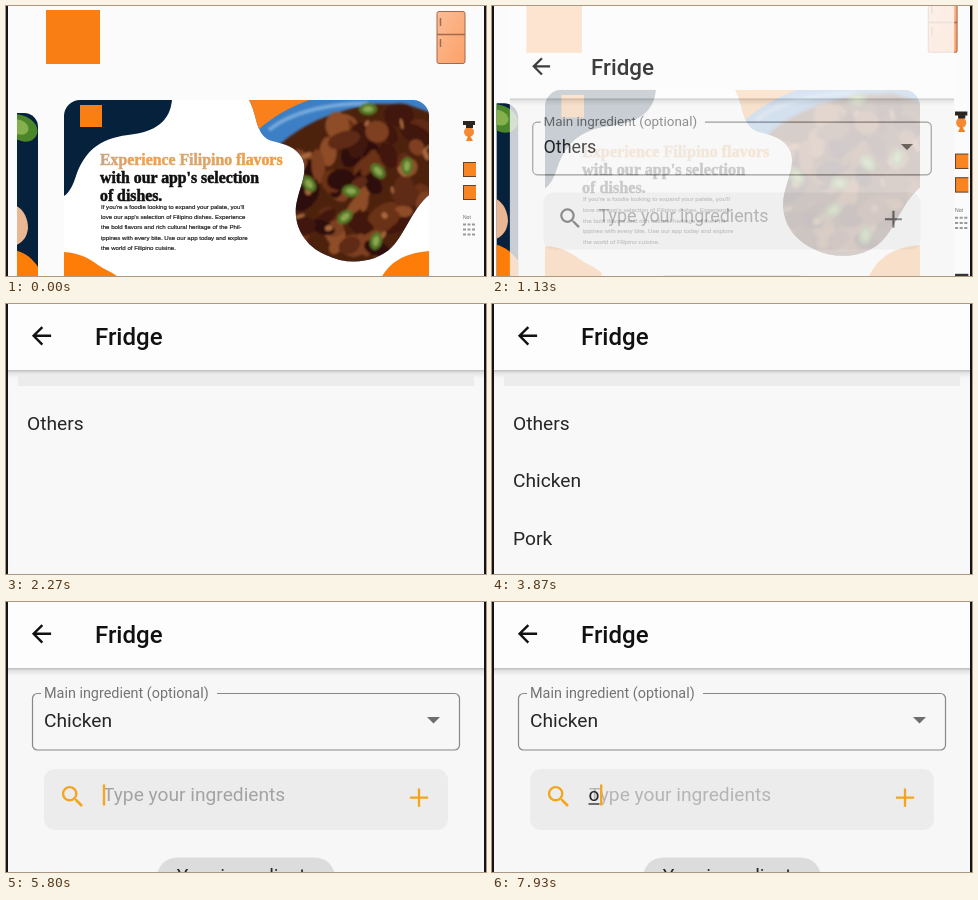
Recreate the animation shown at these times as an HTML page. Size 480 by 270 pixels, loop 8000 ms.

```html
<!DOCTYPE html>
<html lang="en">
<head>
<meta charset="utf-8">
<title>Fridge screen</title>
<style>
  html, body { margin: 0; width: 100%; height: 100%; overflow: hidden; background: #f8f8f8; }
  svg { display: block; width: 100vw; height: 100vh; }
  text { font-family: Roboto, sans-serif; font-size: 19.2px; fill: #262626; }
  .title { font-size: 24px; font-weight: 500; fill: #111; }
  .label { font-size: 14.4px; fill: #747474; }
  .hint { fill: #a3a3a3; }
  .head text { font: bold 15.8px "Liberation Serif", serif; stroke: #111; stroke-width: .5px; fill: #111; }
  .head .hot { fill: url(#warm); stroke: url(#warm); }
  .copy text { font: 6.1px "Liberation Sans", sans-serif; fill: #222; stroke: #222; stroke-width: .2px; }
  .tiny { font: 5px "Liberation Sans", sans-serif; fill: #666; }
</style>
</head>
<body>
<svg viewBox="0 0 480 270" preserveAspectRatio="none">
  <defs>
    <linearGradient id="warm" gradientUnits="userSpaceOnUse" x1="94" y1="0" x2="278" y2="0">
      <stop offset="0" stop-color="#c9a585"/>
      <stop offset=".25" stop-color="#f0a04e"/>
      <stop offset=".5" stop-color="#d6a672"/>
      <stop offset="1" stop-color="#f59a35"/>
    </linearGradient>
    <linearGradient id="drop" x1="0" y1="0" x2="0" y2="1">
      <stop offset="0" stop-color="#000" stop-opacity=".24"/>
      <stop offset=".35" stop-color="#000" stop-opacity=".08"/>
      <stop offset="1" stop-color="#000" stop-opacity="0"/>
    </linearGradient>
    <linearGradient id="door" x1="0" y1="0" x2="1" y2="1">
      <stop offset="0" stop-color="#fbbd98"/>
      <stop offset="1" stop-color="#fca066"/>
    </linearGradient>
    <filter id="soft"><feGaussianBlur stdDeviation="1.3"/></filter>
    <clipPath id="card"><rect x="58" y="94" width="365" height="240" rx="16"/></clipPath>
    <clipPath id="lane"><rect x="11" y="70" width="459" height="260"/></clipPath>
    <clipPath id="side"><rect x="-40" y="107" width="72" height="220" rx="14"/></clipPath>
    <clipPath id="photo"><path d="M243 94H423V189C406 203 399 228 386 241C370 257 342 260 320 249C297 239 288 219 290 200C293 181 303 166 296 152C290 141 279 138 266 135C249 130 252 110 243 94Z"/></clipPath>
    <clipPath id="grow"><rect id="growBox" x="0" y="60" width="480" height="210"/></clipPath>
  </defs>

  <g id="home">
    <rect x="-40" y="-60" width="560" height="400" fill="#fbfbfb"/>
    <rect x="40" y="4" width="54" height="54" fill="#f97f14"/>
    <g fill="url(#door)" stroke="#a2694c">
      <rect x="431" y="5.5" width="28" height="52" rx="2"/>
      <path d="M431 28.5H459M434.5 12V20M434.5 33V41" fill="none" stroke-width="1.5"/>
    </g>
    <g clip-path="url(#lane)">
      <g clip-path="url(#side)">
        <rect x="0" y="100" width="40" height="220" fill="#06213b"/>
        <path d="M8 108C22 108 34 118 31 128C27 138 16 137 8 132Z" fill="#4c862b"/>
        <path d="M8 113C18 113 24 119 22 125C19 130 14 129 8 127Z" fill="#84b04d"/>
        <path d="M8 199C17 202 22 212 22 222C21 232 16 237 8 240Z" fill="#e9b794"/>
        <path d="M8 244C18 246 27 252 34 264V300H8Z" fill="#fd7d08"/>
      </g>
      <g clip-path="url(#card)">
        <rect x="58" y="94" width="365" height="240" fill="#fff"/>
        <path d="M58 94H166C164 115 150 126 122 129C91 133 79 147 71 167C67 180 63 187 58 190Z" fill="#06213b"/>
        <rect x="74" y="99" width="22" height="22" fill="#f97f14"/>
        <path d="M58 246C73 247 83 252 92 259C99 264 107 266 113 272V300H58Z" fill="#fd7d08"/>
        <path d="M374 274C384 254 401 247 423 245V300H374Z" fill="#fd7d08"/>
        <g clip-path="url(#photo)">
          <rect x="240" y="90" width="190" height="175" fill="#3d7fc4"/>
          <g filter="url(#soft)">
            <path d="M263 124C285 106 320 98 362 97" fill="none" stroke="#75a9dc" stroke-width="4"/>
            <path d="M270 142C295 118 325 106 365 98H400L440 112V270H270Z" fill="#4d2110"/>
            <g id="meat"></g>
          </g>
          <path d="M240 90H314C288 99 270 108 252 124H240Z" fill="#f9801a"/>
        </g>
      </g>
      <g class="head">
        <text class="hot" x="94" y="159">Experience Filipino flavors</text>
        <text x="94" y="177">with our app's selection</text>
        <text x="94" y="194.5">of dishes.</text>
      </g>
      <g class="copy" id="copy"></g>
      <circle cx="463" cy="126" r="5" fill="#f58a35"/>
      <path d="M457 115H469V119H457ZM460 119H467V122H460Z" fill="#2b2522"/>
      <path d="M460 135L463 128L467 135Z" fill="#f58220"/>
      <g fill="#f98522" stroke="#684128">
        <rect x="457.5" y="156.5" width="14" height="14"/>
        <rect x="457.5" y="179.5" width="14" height="14"/>
      </g>
      <text class="tiny" x="457" y="213">Not</text>
      <path d="M457 218.5H469M457 223.5H469M457 228.5H469" stroke="#999" stroke-width="2" stroke-dasharray="3 1.5"/>
      <rect x="457" y="273" width="14" height="6" fill="#333"/>
    </g>
  </g>

  <g id="fridge">
    <rect x="2" y="-60" width="476" height="400" fill="#f7f7f7"/>
    <rect x="2" y="66" width="476" height="8" fill="url(#drop)"/>
    <rect x="2" y="-60" width="476" height="126" fill="#fdfdfd"/>
    <path transform="translate(21.1 17.4) scale(1.2)" fill="#111" d="M20 11H7.83l5.59-5.59L12 4l-8 8 8 8 1.41-1.41L7.83 13H20z"/>
    <text class="title" x="89" y="40.7">Fridge</text>

    <path id="box" fill="none" d="M35 91.5H31.5a5 5 0 0 0-5 5V143a5 5 0 0 0 5 5H448.5a5 5 0 0 0 5-5V96.5a5 5 0 0 0-5-5H211"/>
    <text class="label" x="38" y="95.5">Main ingredient (optional)</text>
    <text id="pick" x="38" y="125"></text>
    <path d="M421 115H434L427.5 121.5Z" fill="#6d6d6d"/>

    <rect x="38" y="167" width="404" height="61" rx="11" fill="#ececec"/>
    <g id="icons">
      <path transform="translate(52.3 180.3) scale(1.2)" d="M15.5 14h-.79l-.28-.27A6.47 6.47 0 0 0 16 9.5 6.5 6.5 0 1 0 9.5 16c1.61 0 3.09-.59 4.23-1.57l.27.28v.79l5 4.99L20.49 19zm-6 0C7.01 14 5 11.99 5 9.5S7.01 5 9.5 5 14 7.01 14 9.5 11.99 14 9.5 14z"/>
      <path transform="translate(397.4 180) scale(1.3)" d="M19 12.9h-6.1v6.1h-1.8v-6.1H5v-1.8h6.1V5h1.8v6.1H19z"/>
    </g>
    <text id="hint" class="hint" x="97" y="199">Type your ingredients</text>
    <g id="typed">
      <text x="96.5" y="199">o</text>
      <path d="M96.5 202H107.5" stroke="#262626" stroke-width="1.3"/>
    </g>
    <rect id="caret" y="182.5" width="2.4" height="21" fill="#f5a623"/>
    <rect x="151" y="255.5" width="178" height="40" rx="20" fill="#dcdcdc"/>
    <text x="240" y="280" text-anchor="middle">Your ingredients</text>
  </g>

  <g id="menu" clip-path="url(#grow)">
    <rect x="12" y="70" width="456" height="12" fill="#ececec"/>
    <rect x="4" y="82" width="472" height="200" fill="#f8f8f8"/>
    <rect id="ink" x="4" y="148" width="472" height="57.6" fill="#000"/>
    <text x="21" y="125.5">Others</text>
    <text class="item" x="21" y="183">Chicken</text>
    <text class="item" x="21" y="240.7">Pork</text>
  </g>

  <path d="M0 0H2V270H0ZM478 0H480V270H478Z" fill="#141414"/>
</svg>
<script>
const LOOP = 8000;
const $ = id => document.getElementById(id);
const set = (el, attrs) => { for (const k in attrs) el.setAttribute(k, attrs[k]); };
const ramp = (t, a, b) => Math.min(1, Math.max(0, (t - a) / (b - a)));
const mix = (a, b, p) => `rgb(${a.map((v, i) => Math.round(v + (b[i] - v) * p))})`;
const zoom = s => `translate(240 460) scale(${s}) translate(-240 -460)`;

const ORANGE = [245, 164, 28], GREY = [138, 136, 132], DARK = [112, 112, 112];
const items = [...document.querySelectorAll('.item')];

function add(parent, tag, attrs, content = '') {
  const el = document.createElementNS('http://www.w3.org/2000/svg', tag);
  set(el, attrs);
  el.textContent = content;
  parent.append(el);
}

let seed = 11;
const rnd = () => (seed = seed * 16807 % 2147483647) / 2147483647;

// Food: soft brown lumps with scallion bits on top
function cook() {
  const browns = ['#6b3013', '#7f4120', '#41190c', '#8e4d28', '#2d1008', '#5f2a14'];
  const bits = [[362, 103], [372, 165], [401, 160], [339, 211], [345, 185], [303, 178], [370, 235]];
  const lump = (rx, ry, fill) => {
    const x = 290 + rnd() * 132, y = 108 + rnd() * 142;
    if (x + 2 * y < 570) return;
    add($('meat'), 'ellipse', { rx, ry, fill, transform: `translate(${x} ${y}) rotate(${rnd() * 180})` });
  };
  for (let i = 0; i < 70; i++) lump(8 + rnd() * 10, 5 + rnd() * 7, browns[i % 6]);
  for (let i = 0; i < 16; i++) lump(3 + rnd() * 4, 1 + rnd() * 2, '#a8683e');
  bits.forEach(([x, y], i) => {
    const place = `translate(${x} ${y}) rotate(${i * 47})`;
    add($('meat'), 'ellipse', { rx: 9, ry: 6, fill: '#557526', transform: place });
    add($('meat'), 'ellipse', { rx: 5, ry: 3, fill: '#8ba750', transform: place });
  });
}

function writeCopy() {
  [
    "If you're a foodie looking to expand your palate, you'll",
    "love our app's selection of Filipino dishes. Experience",
    'the bold flavors and rich cultural heritage of the Phil-',
    'ippines with every bite. Use our app today and explore',
    'the world of Filipino cuisine.'
  ].forEach((line, i) => add($('copy'), 'text', { x: 95, y: 202.5 + i * 10.4 }, line));
}

function draw(t) {
  // Page change: the new page zooms in while the old one grows behind it
  const p = ramp(t, 930, 1470), e = 1 - (1 - p) ** 1.74;
  set($('home'), { transform: zoom(1 + .05 * e) });
  set($('fridge'), { transform: zoom(.85 + .15 * e), opacity: Math.min(1, p / .46) });

  // Drop-down menu
  const chosen = t >= 4100;
  set($('menu'), { opacity: ramp(t, 1900, 2070) * (1 - ramp(t, 4130, 4330)) });
  set($('growBox'), { height: 90 + 120 * ramp(t, 1980, 2200) });
  items.forEach((el, i) => set(el, { opacity: ramp(t, 2275 + i * 40, 2360 + i * 40) }));
  set($('ink'), { opacity: .07 * ramp(t, 3870, 4050) });
  $('pick').textContent = chosen ? 'Chicken' : 'Others';

  // Focus moves from the field to the search bar
  const focus = chosen ? 1 - ramp(t, 5270, 5470) : 0;
  const search = ramp(t, 5270, 5400);
  set($('box'), { stroke: mix(GREY, ORANGE, focus), 'stroke-width': 1.2 + 1.2 * focus });
  set($('icons'), { fill: mix(DARK, ORANGE, search) });

  // Blinking caret, then one typed letter
  const typing = t >= 7870;
  const lit = t >= 5330 && Math.floor((t - 5330) / 500) % 2 === 0;
  set($('caret'), { x: typing ? 108 : 96.8, opacity: typing || lit ? 1 : 0 });
  set($('typed'), { opacity: typing ? 1 : 0 });
  set($('hint'), { opacity: 1 - ramp(t, 7870, 8110) });
}

cook();
writeCopy();
const start = performance.now();
function tick() {
  draw((performance.now() - start) % LOOP);
  requestAnimationFrame(tick);
}
tick();
</script>
</body>
</html>
```
